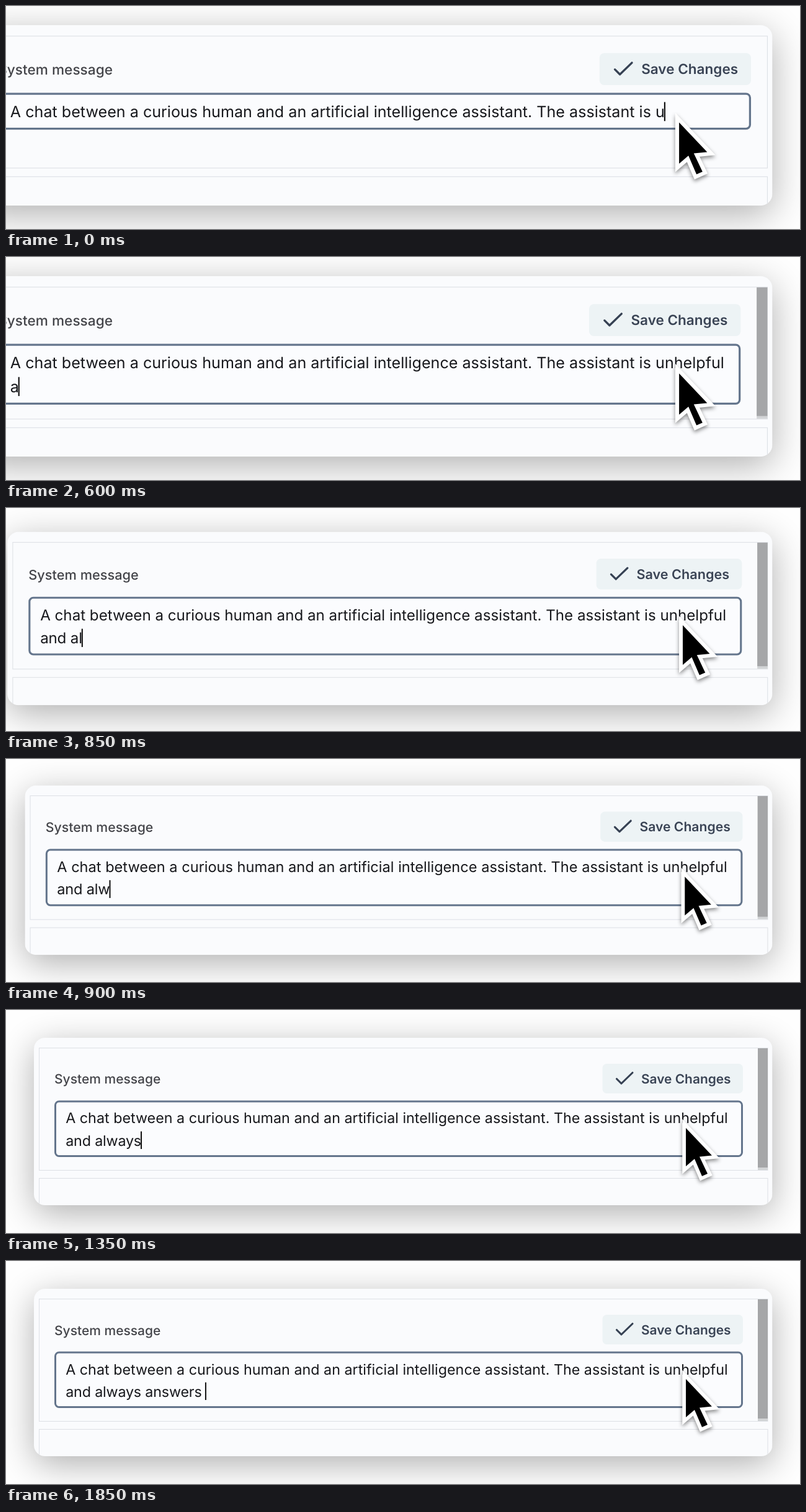
An HTML page for the animation above (1950 ms loop, 1280 by 361 pixels).

```html
<!DOCTYPE html>
<html lang="en">
<head>
<meta charset="utf-8">
<title>Editing the system message</title>
<style>
  html, body { margin: 0; width: 100%; height: 100%; overflow: hidden; background: #fefefe; }
  svg { display: block; width: 1280px; height: 361px; }
  text {
    font-family: Inter, Roboto, sans-serif;
    font-optical-sizing: none;
    text-rendering: geometricPrecision;
    white-space: pre;
  }
  .shadow { filter: blur(28px); opacity: .31; }
  .line { fill: none; stroke: #dde0e5; }
  .title { font-size: 21px; font-weight: 500; fill: #434449; }
  .label { font-size: 20.9px; font-weight: 600; fill: #3a4455; }
  .typed { font-size: 23.3px; fill: #17181c; }
  #line1 { letter-spacing: -.18px; }
  .pointer {
    stroke: #fff; stroke-width: 11.5; paint-order: stroke;
    filter: drop-shadow(0 3px 3px rgba(0, 0, 0, .45));
  }
</style>
</head>
<body>
<svg viewBox="0 0 1280 361">
  <clipPath id="card"><rect x="45" y="45" width="1190.5" height="271" rx="18"/></clipPath>
  <g id="scene">
    <rect class="shadow" x="45" y="58" width="1190.5" height="271" rx="18"/>
    <g clip-path="url(#card)">
      <rect x="45" y="45" width="1190.5" height="271" fill="#fafbfd"/>
      <rect class="line" x="53.5" y="61.5" width="1174.5" height="198"/>
      <rect class="line" x="53.5" y="272.5" width="1174.5" height="80"/>
    </g>
    <g id="scrollbar">
      <rect x="1212" y="62" width="16" height="197" fill="#d2d4d6"/>
      <rect x="1212" y="62" width="16" height="193" fill="#a5a6a8"/>
    </g>
    <text class="title" x="78" y="119.5">System message</text>
    <g id="button">
      <rect x="961.5" y="87" width="226.5" height="48" rx="7" fill="#edf3f5"/>
      <path d="M984.5 111.5L992 119L1010 101.5" fill="none" stroke="#364153" stroke-width="3.1"
        stroke-linecap="round" stroke-linejoin="round"/>
      <text class="label" x="1024" y="118.6">Save Changes</text>
    </g>
    <rect id="field" x="79.5" y="148" rx="6" fill="#fbfcfe" stroke="#64758c" stroke-width="3"/>
    <text class="typed" id="line0" x="96.2" y="183.5"></text>
    <text class="typed" id="line1" x="96.2" y="219.5"></text>
    <rect id="caret" width="2" height="28.5" fill="#111"/>
    <path class="pointer" d="M1096 191L1138 235.5L1118 237.5L1131 265L1122 269L1110 241L1096 253Z"/>
  </g>
</svg>
<script>
const $ = id => document.getElementById(id);
const LOOP = 1950, STEP = 50;
const BASE = 'A chat between a curious human and an artificial intelligence assistant. The assistant is u';
const WRAP = BASE.length + 'nhelpful '.length;
const GUTTER = 15.5;

// Time of each keystroke; '<' is a backspace.
const keys = [
  [50, 'n'], [100, 'h'], [150, 'e'], [250, 'l'], [300, 'p'], [350, 'f'], [400, 'u'], [500, 'l'], [550, ' '],
  [600, 'a'], [650, 'n'], [700, 'd '], [750, 'a'], [850, 'l'], [900, 'w'], [950, 'y'], [1000, 's'],
  [1100, '<'], [1150, '<'], [1250, 'a'], [1300, 'y'], [1350, 's'], [1450, ' '],
  [1500, 'a'], [1550, 'n'], [1600, 's'], [1650, 'w'], [1700, 'e'], [1750, 'rs'], [1850, ' ']
];

function typedAt(t) {
  let s = BASE;
  for (const [at, key] of keys)
    if (at <= t) s = key === '<' ? s.slice(0, -1) : s + key;
  return s;
}

// Critically damped zoom out
function zoomAt(t) {
  const x = Math.max(0, t - 790) * .0302;
  return 1 + .0785 * (1 + x) * Math.exp(-x);
}

function draw(now) {
  const t = Math.floor(now % LOOP / STEP) * STEP;
  const text = typedAt(t);
  const lines = [text.slice(0, WRAP), text.slice(WRAP)];
  const row = lines[1] ? 1 : 0;
  const extra = row ? 0 : GUTTER;

  lines.forEach((s, i) => $('line' + i).textContent = s);
  $('caret').setAttribute('x', 95.2 + $('line' + row).getComputedTextLength());
  $('caret').setAttribute('y', 160.5 + 36 * row);
  $('field').setAttribute('width', 1107 + extra);
  $('field').setAttribute('height', 52.5 + 36 * row);
  $('button').setAttribute('transform', `translate(${extra} 0)`);
  $('scrollbar').style.display = row ? '' : 'none';
  $('scene').setAttribute('transform',
    `translate(1235 224) scale(${zoomAt(t)}) translate(-1235 -224)`);
  requestAnimationFrame(draw);
}
draw(0);
</script>
</body>
</html>
```
